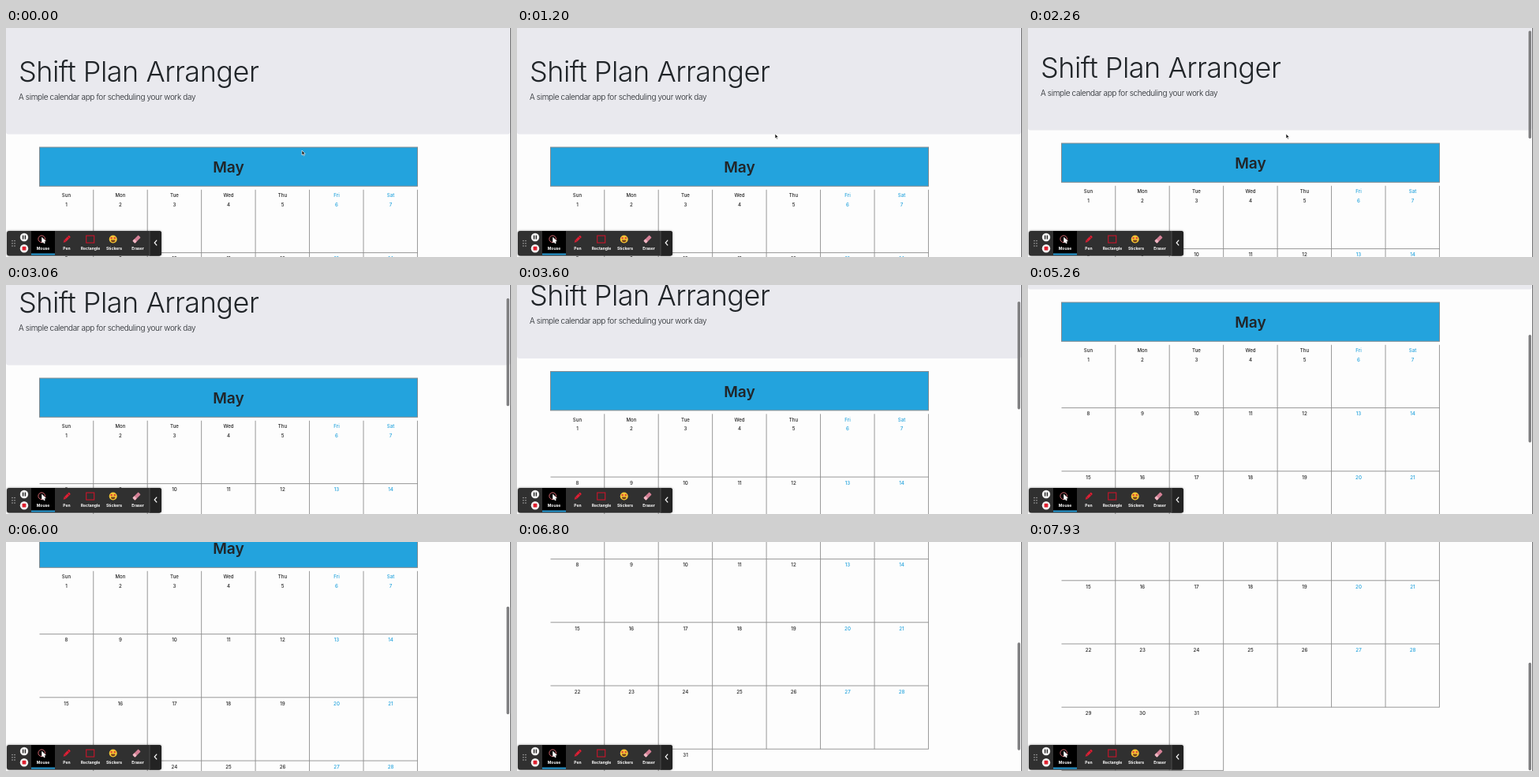
These frames come from a looping animation (640x290 px, 8 s). An HTML page with a canvas:

```html
<!DOCTYPE html>
<html lang="en">
<head>
<meta charset="utf-8">
<title>Calendar scroll</title>
<style>
  html, body { margin: 0; width: 100%; height: 100%; overflow: hidden; background: #fdfdfd; }
  canvas { display: block; width: 640px; height: 290px; }
</style>
</head>
<body>
<canvas id="stage" width="640" height="290"></canvas>
<script>
const ctx = document.getElementById('stage').getContext('2d');
const LOOP = 8000, STEP = 1000 / 15;
const FONT = 'Inter, "Open Sans", sans-serif';
const INK = '#212529', BLUE = '#23a3dd', LINE = '#8d8d8d';
const LEFT = 42.5, COL = 68.45, ROW = 80.2, FIRST_LINE = 284.6;
const DAYS = ['Sun', 'Mon', 'Tue', 'Wed', 'Thu', 'Fri', 'Sat'];

// [time in ms, scroll offset in px]
const SCROLL = [[0, 0], [2000, 0], [2267, 5], [3067, 33], [3733, 42], [3867, 42],
  [4267, 74], [5267, 129], [5467, 129], [6800, 263], [7933, 316], [8000, 316]];

const slope = i => (SCROLL[i + 1][1] - SCROLL[i][1]) / (SCROLL[i + 1][0] - SCROLL[i][0]);

function tangent(i) {
  if (i === 0 || i === SCROLL.length - 1) return 0;
  const a = slope(i - 1), b = slope(i);
  return a * b > 0 ? 2 * a * b / (a + b) : 0;
}

// Monotone cubic through the scroll points
function scrollAt(t) {
  let i = 0;
  while (i < SCROLL.length - 2 && t >= SCROLL[i + 1][0]) i++;
  const [t0, y0] = SCROLL[i], [t1, y1] = SCROLL[i + 1];
  const d = t1 - t0, u = Math.min(1, (t - t0) / d), v = 1 - u;
  return y0 * (1 + 2 * u) * v * v + y1 * u * u * (3 - 2 * u)
    + d * u * v * (v * tangent(i) - u * tangent(i + 1));
}

function text(str, x, y, size, weight, color, align = 'center', spacing = 0) {
  ctx.font = `${weight} ${size}px ${FONT}`;
  ctx.letterSpacing = spacing + 'px';
  ctx.textAlign = align;
  ctx.fillStyle = color;
  ctx.fillText(str, x, y);
}

function rect(x, y, w, h, color, radius = 0) {
  ctx.fillStyle = color;
  ctx.beginPath();
  ctx.roundRect(x, y, w, h, radius);
  ctx.fill();
}

function circle(x, y, r, color) {
  ctx.fillStyle = color;
  ctx.beginPath();
  ctx.arc(x, y, r, 0, Math.PI * 2);
  ctx.fill();
}

function path(points, stroke, width = 1, fill) {
  ctx.beginPath();
  points.forEach(([x, y]) => ctx.lineTo(x, y));
  if (fill) {
    ctx.closePath();
    ctx.fillStyle = fill;
    ctx.fill();
  }
  ctx.strokeStyle = stroke;
  ctx.lineWidth = width;
  ctx.stroke();
}

function tilted(x, y, angle, draw) {
  ctx.save();
  ctx.translate(x, y);
  ctx.rotate(angle);
  draw();
  ctx.restore();
}

function pointer(x, y, scale, fill, edge) {
  const shape = [[0, 0], [0, 7], [1.6, 5.6], [2.7, 8], [3.9, 7.5], [2.8, 5.1], [5, 5]];
  path(shape.map(([px, py]) => [x + px * scale, y + py * scale]), edge, 0.7, fill);
}

function drawCalendar() {
  const right = LEFT + 7 * COL;
  rect(LEFT, 151, 479, 49.3, BLUE);
  ctx.strokeStyle = '#858b8f';
  ctx.lineWidth = 1;
  ctx.strokeRect(LEFT, 151, 479, 49.3);
  text('May', 282, 183, 19.2, 600, INK);

  for (let c = 0; c < 7; c++) {
    const x = LEFT + (c + 1) * COL - 0.2;
    path([[x, 204.8], [x, FIRST_LINE + (c < 3 ? 4 : 3) * ROW]], LINE, 0.9);
    text(DAYS[c], 76.5 + c * 68.5, 214, 6.1, 500, c > 4 ? BLUE : '#222');
  }
  for (let r = 0; r < 5; r++) {
    const y = FIRST_LINE + r * ROW;
    path([[LEFT, y], [r < 4 ? right : LEFT + 3 * COL, y]], LINE, 0.9);
  }
  for (let n = 0; n < 31; n++) {
    const c = n % 7, r = Math.floor(n / 7);
    const y = r ? FIRST_LINE + (r - 1) * ROW + 9.7 : 225.7;
    text(n + 1, 76.5 + c * 68.5, y, 6.2, 500, c > 4 ? BLUE : '#222');
  }
}

function drawPage(offset) {
  ctx.save();
  ctx.translate(0, -offset);
  rect(0, -4, 639, 138.5, '#e9e9ee', 3);
  text('Shift Plan Arranger', 16, 67.5, 36, 300, INK, 'left', -0.5);
  text('A simple calendar app for scheduling your work day', 16, 90.6, 10, 300, INK, 'left', -0.35);
  drawCalendar();
  ctx.restore();
}

function drawToolbar() {
  ctx.save();
  ctx.shadowColor = 'rgba(0,0,0,.45)';
  ctx.shadowBlur = 3;
  rect(1, 257, 196, 31.5, '#303030', 3);
  ctx.restore();
  rect(32, 257, 30, 30.5, '#000');
  rect(32, 285.5, 30, 2, '#2a9fd8');
  rect(182, 257, 15, 31.5, '#232323', [0, 3, 3, 0]);
  rect(181.6, 257, 0.8, 31.5, '#555');

  for (let i = 0; i < 6; i++) circle(8 + (i % 2) * 3, 269.5 + (i >> 1) * 3.2, 0.75, '#bbb');

  circle(23, 265, 5.2, '#f2f2f2');
  rect(20.9, 262.6, 1.4, 4.8, '#222');
  rect(23.7, 262.6, 1.4, 4.8, '#222');
  circle(23, 279.2, 5.2, '#f2f2f2');
  rect(20.6, 276.8, 4.8, 4.8, '#e0202f', 0.8);

  ['Mouse', 'Pen', 'Rectangle', 'Stickers', 'Eraser'].forEach((label, i) =>
    text(label, 47 + i * 30, 281, 5, 700, '#fff'));

  ctx.strokeStyle = '#d66870';
  ctx.lineWidth = 1;
  ctx.beginPath();
  ctx.arc(45.2, 267.2, 4.3, 0, Math.PI * 2);
  ctx.stroke();
  pointer(45.6, 265.2, 0.95, '#fff', '#fff');

  tilted(77, 267.5, Math.PI / 4, () => {
    rect(-1.6, -5.5, 3.2, 8, '#dc2035', 0.8);
    path([[-1.6, 2.8], [1.6, 2.8], [0, 5.8]], '#dc2035', 0.3, '#dc2035');
    rect(-1.6, -3.4, 3.2, 0.7, '#7d1420');
  });

  ctx.strokeStyle = '#c9152b';
  ctx.lineWidth = 1.1;
  ctx.strokeRect(101.7, 263, 10, 9);

  circle(135.7, 267.5, 5, '#f4c534');
  circle(133.6, 266, 1.3, '#df4935');
  circle(137.8, 266, 1.3, '#df4935');
  ctx.fillStyle = '#74401d';
  ctx.beginPath();
  ctx.arc(135.7, 268.5, 2.7, 0, Math.PI);
  ctx.fill();

  tilted(165.5, 267.5, Math.PI / 4, () => {
    rect(-2.2, -5.2, 4.4, 10.4, '#d58096', 1);
    rect(-2.2, 1.8, 4.4, 3.4, '#eeb7c3', 1);
  });

  path([[191.2, 268.6], [188.2, 272], [191.2, 275.4]], '#fff', 1.2);
}

function drawCursor(t) {
  if (t > 2700) return;
  const u = Math.min(1, t / 860), ease = u * u * (3 - 2 * u);
  pointer(375 - 48 * ease, 155 - 21 * ease, 0.85, '#111', '#f4f4f4');
}

function render(now) {
  const t = Math.floor((now % LOOP + 7) / STEP) * STEP;
  const offset = scrollAt(t);
  rect(0, 0, 640, 290, '#fdfdfd');
  drawPage(offset);
  if (t > 2010) rect(634.4, 1 + offset * 0.48, 3.4, 136.5, '#7c7c7e', 1.7);
  rect(639.2, 0, 0.8, 290, '#4a4a4c');
  drawCursor(t);
  drawToolbar();
}

const start = performance.now();
function loop() {
  render(performance.now() - start);
  requestAnimationFrame(loop);
}
loop();
</script>
</body>
</html>
```
